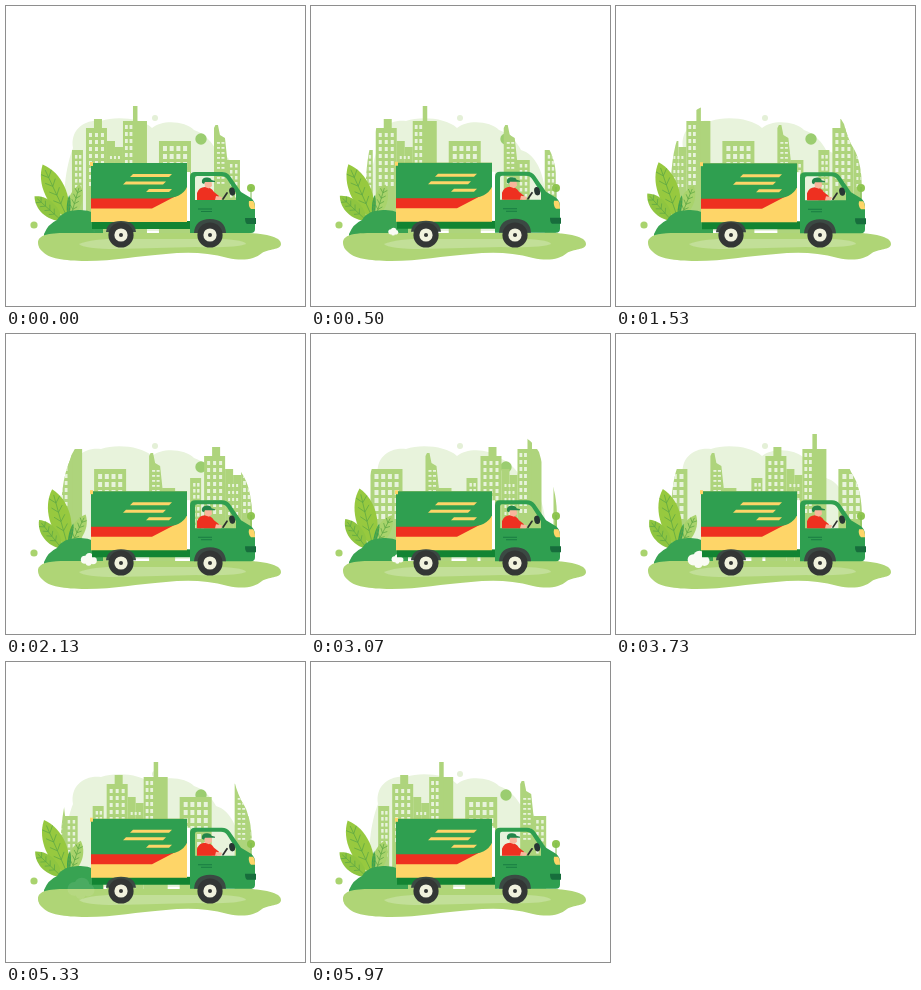
Write an HTML page that moves like this. It is 299x300 px and loops after 6.01 s.

```html
<!DOCTYPE html>
<html lang="en">
<head>
<meta charset="utf-8">
<title>Delivery truck</title>
<style>
html, body { margin: 0; width: 100%; height: 100%; overflow: hidden; background: #fff; }
svg { display: block; width: 100vw; height: 100vh; }
</style>
</head>
<body>
<svg viewBox="0 0 299 300">
  <defs>
    <clipPath id="view">
      <path d="M55 229C53 180 55 146 64 126Q70 104 95 98H205Q222 106 228 118Q232 134 238 143Q246 157 246 185V229Z"/>
    </clipPath>
    <g id="city"></g>
    <g id="wheel">
      <circle r="12.6" fill="#333635"/>
      <circle r="6.6" fill="#f1f2de"/>
      <circle r="2" fill="#333635"/>
    </g>
  </defs>

  <path fill="#e8f3dc" d="M61 225C55 190 60 160 67 142C64 124 78 113 95 115C110 110 135 112 146 122C156 113 180 115 188 124C198 127 206 136 210 144C224 148 232 165 234 185V225Z"/>
  <circle cx="149" cy="112" r="3" fill="#e4f0d7"/>
  <circle cx="195" cy="133" r="5.7" fill="#9bcd70"/>
  <g clip-path="url(#view)">
    <g id="scroll"><use href="#city"/><use href="#city" x="183"/></g>
  </g>
  <circle cx="245" cy="182" r="4" fill="#8fc550"/>
  <path d="M245 181V202" stroke="#7dbb50"/>
  <circle cx="28" cy="219" r="3.6" fill="#a9d36e"/>

  <g id="leaves"></g>
  <path fill="#38a352" d="M38 228Q42 218 51 214Q57 204 72 204Q89 203 97 215V230H38Z"/>
  <path fill="#afd576" d="M32 237C32 229 42 227 60 227H225C255 226 275 230 275 238C275 244 262 243 256 247C248 254 236 255 222 252C200 246 180 246 160 248C130 250 110 255 80 255C58 255 42 252 37 246Q32 242 32 237Z"/>
  <path fill="#c2df98" d="M73 238Q88 232 125 233H215Q239 234 240 238Q230 242 190 241L111 243Q78 243 73 238Z"/>
  <g id="smoke"></g>

  <g id="truck">
    <path fill="#128432" d="M86 215H184V223H86Z"/>
    <path fill="#fed568" d="M85 157H181V216H85Z"/>
    <path fill="#ee3020" d="M85 190H170L146 202.500H85Z"/>
    <path fill="#2f9f50" d="M85 157H181V181Q176 192 158 192.500H85Z"/>
    <path fill="#fed568" d="M127 168H166L163 171H124ZM120 175.500H160L157 178.500H117ZM143 183H166L163 186H140Z"/>
    <path fill="#fff" d="M181 166H184V215H181Z"/>
    <path fill="#2f9f50" fill-rule="evenodd" d="M184 171Q184 166 189 166H216Q221 166 224 170L235 186L245 192Q249 195 249 201V223Q249 227 245 227H184ZM189 172V194H230V187L221 173Q219 170 215 170H191Q189 170 189 172Z"/>
    <path fill="#ee3020" d="M191 194V187Q193 181 199 181Q205 181 208 186L213 190L211 194Z"/>
    <path fill="#f8b69c" d="M198 175H205.500L206 180L203 182.500L199 181ZM210 190L216 191L215 194H209Z"/>
    <path fill="#23864a" d="M196 177Q195 172 200 171.500Q205 171 205.500 174L209 175V176H199L198 178Z"/>
    <path stroke="#2d302f" stroke-width="1.700" stroke-linecap="round" d="M217 193L221 187"/>
    <ellipse cx="226" cy="185.500" rx="2.900" ry="4.200" fill="#283633" transform="rotate(-12 226 185)"/>
    <path fill="#187c41" d="M192 202.500H206V203.500H192ZM195 205H206V206H195Z"/>
    <path fill="#fed568" d="M243 195H247Q249 197 249 203H245Q242 200 243 195Z"/>
    <path fill="#176d3c" d="M239 212H250V218H241Q239 217 239 212Z"/>
    <path fill="#3b4943" d="M188 227Q189 213 204 213T220 227ZM100 226Q101 215 115 215T130 226Z"/>
    <path fill="#fed568" d="M84 156H87V160H84Z"/>
  </g>
  <use href="#wheel" x="115" y="229"/>
  <use href="#wheel" x="204" y="229"/>
</svg>
<script>
const LOOP = 6010, SPAN = 183, TAU = Math.PI * 2;
const $ = id => document.getElementById(id);
const rect = (x, y, w, h, fill) =>
  `<rect x="${x}" y="${y}" width="${w}" height="${h}" fill="${fill}"/>`;
const wall = (x, top, w) => rect(x, top, w, 229 - top, '#aed47c');

function panes(x, y, cols, rows, dx, dy, w, h) {
  let out = '';
  for (let i = 0; i < cols * rows; i++)
    out += rect(x + i % cols * dx, y + Math.floor(i / cols) * dy, w, h, '#e8f3dc');
  return out;
}

$('city').innerHTML =
  wall(66, 144, 11) + panes(69, 149, 2, 8, 4, 6, 2.4, 3.6) +
  wall(80, 122, 21) + wall(88, 113, 8) + wall(101, 135, 8) +
  panes(83, 127, 3, 8, 6, 7, 3, 4) +
  wall(109, 141, 8) + panes(104, 150, 3, 5, 4, 7, 2, 3) +
  wall(117, 115, 24) + wall(127, 100, 4.5) + panes(119, 119, 2, 9, 4.6, 7, 2.8, 4) +
  wall(153, 135, 32) + panes(157, 140, 4, 6, 6.7, 8, 4, 5) +
  '<path fill="#aed47c" d="M208 229V122L209.5 119H212L214 129L219 132L222 160L224 229Z"/>' +
  panes(211, 136, 2, 9, 4.5, 5, 3, 1.8) +
  wall(221, 154, 13) + panes(224, 158, 2, 7, 5, 6, 2.5, 3.5);

// Each leaf: base x, base y, length, half width, resting angle, colour
const leaves = [
  [64, 213, 36, 9, 16, '#a9d36c'],
  [62, 213, 60, 14, -25, '#97c93f'],
  [56, 215, 37, 10, -48, '#8fc540'],
  [62, 213, 24, 2.5, 3, '#38a352']
];
$('leaves').innerHTML = leaves.map(([, , len, w, , fill]) => {
  let veins = `M0 0V${-len * .9}`;
  for (let k = .28; k < .8; k += .16)
    veins += `M${-w * .4} ${-len * (k + .1)}L0 ${-len * k}L${w * .4} ${-len * (k + .1)}`;
  return `<g><path fill="${fill}" d="M0 0C${-w} ${-len * .3} ${-w} ${-len * .75} 0 ${-len}C${w} ${-len * .75} ${w} ${-len * .3} 0 0"/>
    <path d="${veins}" fill="none" stroke="#5fa844" stroke-width=".7"/></g>`;
}).join('');

// Each puff: start, lifetime, size
const puffs = [[0, 1200, .45], [1650, 1250, .75], [2800, 2300, 1], [3900, 1500, .8]];
$('smoke').innerHTML = puffs.map(() =>
  '<g fill="#fafbf4"><circle r="5.5" cx="-5"/><circle r="6" cx="1" cy="-3"/><circle r="5" cx="6" cy="1"/><circle r="4" cy="4"/></g>').join('');

function draw(now) {
  const t = now % LOOP, phase = t / LOOP * TAU;
  $('scroll').setAttribute('transform', `translate(${-SPAN * t / LOOP})`);
  leaves.forEach(([x, y, , , angle], i) =>
    $('leaves').children[i].setAttribute('transform',
      `translate(${x} ${y}) rotate(${angle + 6 * (1 - Math.cos(phase))})`));
  puffs.forEach(([start, life, size], i) => {
    const p = (t - start) / life, puff = $('smoke').children[i];
    const on = p > 0 && p < 1;
    puff.setAttribute('opacity', on ? Math.min(1, (1 - p) * 2) : 0);
    if (on) puff.setAttribute('transform',
      `translate(${88 - 14 * p} ${225 + 2 * p}) scale(${size * 1.6 * Math.sqrt(p)})`);
  });
  $('truck').setAttribute('transform', `translate(0 ${.3 * Math.sin(phase * 20)})`);
}

const begin = performance.now();
function tick() {
  draw(performance.now() - begin);
  requestAnimationFrame(tick);
}
tick();
</script>
</body>
</html>
```
